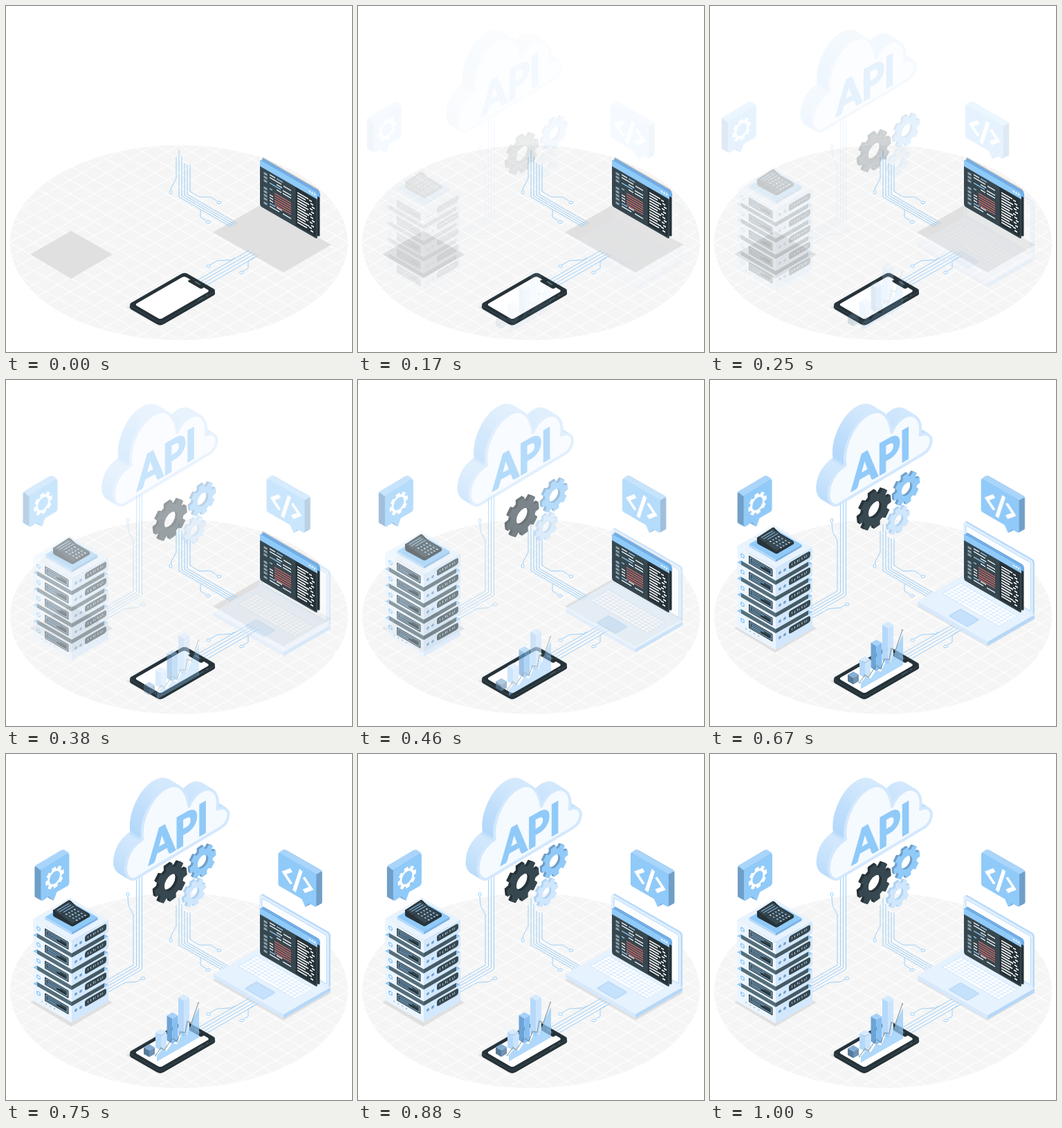
An HTML page for the animation above (1.04 s loop, 500 px wide and 500 px high).

```html
<!DOCTYPE html>
<html>
<head>
<meta charset="utf-8">
<style>
html, body { margin: 0; width: 100%; height: 100%; overflow: hidden; background: #fff }
svg { display: block; width: 100vw; height: 100vh }
</style>
</head>
<body>
<svg id="stage" viewBox="0 0 500 500"></svg>
<script>
const K = 0.577; // isometric slope
const BLUE = '#90caf9', DEEP = '#709fc8', PALE = '#d3e8fd', DARK = '#263238', SLATE = '#37474f';

const range = (n, f) => Array.from({ length: n }, (_, i) => f(i)).join('');
const path = (d, fill, extra = '') => `<path d="${d}" fill="${fill}" ${extra}/>`;
const line = (d, color, w, extra = '') => path(d, 'none', `stroke="${color}" stroke-width="${w}" ${extra}`);
const rect = (x, y, w, h, fill, r = 0, extra = '') =>
  `<rect x="${x}" y="${y}" width="${w}" height="${h}" rx="${r}" fill="${fill}" ${extra}/>`;
const dot = (x, y, r, fill, extra = '') => `<circle cx="${x}" cy="${y}" r="${r}" fill="${fill}" ${extra}/>`;
const plane = (a, b, c, d) => (x, y, s) => `<g transform="matrix(${a} ${b} ${c} ${d} ${x} ${y})">${s}</g>`;
const falling = plane(1, K, 0, 1);   // wall going down to the right
const rising = plane(1, -K, 0, 1);   // wall going up to the right
const flat = plane(1, K, -1, K);     // floor
const tilted = plane(.866, -.5, 0, 1); // rising wall in true units
const moving = (kind, s) => `<g data-move="${kind}">${s}</g>`;

// Box given by its front top vertex, left and right widths, height
function box(x, y, a, b, h, [top, left, right]) {
  return path(`M${x} ${y}l${-a} ${-a * K}l${b} ${-b * K}l${a} ${a * K}z`, top) +
    path(`M${x} ${y}l${-a} ${-a * K}v${h}l${a} ${a * K}z`, left) +
    path(`M${x} ${y}l${b} ${-b * K}v${h}l${-b} ${b * K}z`, right);
}

// Stack copies from back to front to give a shape thickness
const extrude = (d, dx, dy, fill, n = 12) =>
  range(n, i => path(d, fill, `transform="translate(${dx * (1 - i / n)} ${dy * (1 - i / n)})"`));

function gearPath(r, hole) {
  let d = '';
  for (let i = 0; i < 8; i++)
    [[-.36, .78], [-.25, 1], [.25, 1], [.36, .78]].forEach(([o, q]) => {
      const a = (i + o - .15) * Math.PI / 4;
      d += (d ? 'L' : 'M') + (r * q * Math.cos(a)).toFixed(2) + ' ' + (r * q * Math.sin(a)).toFixed(2);
    });
  return d + `ZM${hole} 0A${hole} ${hole} 0 1 0 ${-hole} 0A${hole} ${hole} 0 1 0 ${hole} 0Z`;
}
function gear(x, y, r, hole, front, side, depth) {
  const d = gearPath(r, hole), rule = 'fill-rule="evenodd"';
  return range(6, i => tilted(x - depth * (1 - i / 6), y - depth * .58 * (1 - i / 6), path(d, side, rule))) +
    tilted(x, y, path(d, front, rule));
}

function floor() {
  const grid = range(41, i => {
    const v = (i - 20) * 17.5;
    return `M${v} -350V350M-350 ${v}H350`;
  });
  return '<clipPath id="disc"><ellipse cx="250" cy="342" rx="244" ry="141"/></clipPath>' +
    '<g clip-path="url(#disc)"><rect width="500" height="500" fill="#f5f5f5"/>' +
    flat(250, 342, line(grid, '#fff', 1)) + '</g>' +
    path('M35 359L94 325L154 359L94 394Z', '#e0e0e0') +
    path('M299 327L367 288L470 345L401 385Z', '#e0e0e0') +
    path('M174 435L258 387L300 412L222 463Z', '#e0e0e0');
}

const wires = (d, ends) => line(d, BLUE, .9) +
  ends.map(([x, y, a, b]) => `<ellipse cx="${x}" cy="${y}" rx="${a}" ry="${b}" fill="#fff" stroke="${BLUE}" stroke-width=".9"/>`).join('');

const fixedWires = () => wires(
  'M246 218V249L238.500 263V266' +
  [208, 217, 227, 229].map((top, i) => `M${250 + i * 4} ${top}V${276 - i * 1.2}l${75 - i} ${(75 - i) * K}`).join('') +
  'M266 229V268L279 276H296L305 282M281 295V305L289 310' +
  range(4, i => `M${277 + i * 4.3} ${396 + i * 2.5}l74.5 -43`) +
  'M331 364L325 367L306 368L295 374M358 363L350 369V379L343 383',
  [[238, 269, 2, 2.6], [308, 284, 2.9, 1.8], [292, 312, 2.9, 1.8], [292.5, 376, 2.9, 1.8], [340.5, 385, 2.9, 1.8]]);

const serverWires = () => wires(
  'M176 206L177 219L184 232V305L146 327M188.500 165V307L146 331.500M192.500 165V309L146 336M196.500 165V311.500L146 340.500' +
  'M146 345L172 330.500L189 329L196 325',
  [[176, 203, 1.9, 2.6], [198, 324, 2.9, 1.8]]);

function cloud() {
  const d = 'M186 180C177 184 170 174 172 161C174 144 184 131 196 123C192 97 209 57 235 47C250 42 260 54 263 76' +
    'C270 58 285 48 295 52C304 56 306 66 304 80C314 75 321 81 320 89C319 97 315 103 308 107Z';
  const stops = [[0, '#d6eafd'], [.3, '#bfdefb'], [.56, '#b3d8fb'], [.6, '#d3e8fd'], [1, '#b9dbfb']];
  return '<linearGradient id="side" gradientUnits="userSpaceOnUse" x1="0" y1="42" x2="0" y2="182">' +
    stops.map(([o, c]) => `<stop offset="${o}" stop-color="${c}"/>`).join('') + '</linearGradient>' +
    range(16, i => path(d, 'url(#side)', `stroke="url(#side)" stroke-width="4" transform="translate(${i - 16} ${(i - 16) * .6})"`)) +
    path(d, '#f5faff', `stroke="${PALE}" stroke-width="4" stroke-linejoin="round"`) +
    tilted(205.5, 160, `<text font-family="Lato, sans-serif" font-weight="700" font-size="61" fill="${BLUE}" stroke="${BLUE}" stroke-width="2.8">API</text>`);
}

function gearBubble() {
  const d = 'M52 165.500L87 144.500Q90 143 90 146V186Q90 189 87 191L72 199.500L67.500 212L60.500 206L52 211.500Q49 213 49 210V170Q49 167 52 165.500Z';
  return extrude(d, -9, -5, DEEP) +
    path('M41 162Q40.500 161.500 43 160L78 139.500Q81 137.500 83 138.500L89.500 143L51 166.500L48.500 168Z', '#a9d5fb') +
    path(d, BLUE) + tilted(69, 178.5, path(gearPath(15.5, 8.8), '#fff', 'fill-rule="evenodd"'));
}

function codeBubble() {
  const d = 'M395 143.500L444 171.500Q447 173 447 176V218Q447 222 444 220L437 216L431 221L426 209.500L395 191.500Q392 190 392 187V145Q392 142 395 143.500Z';
  return extrude(d, 8.5, -4.5, DEEP) +
    path('M392.500 143L398.500 138.500Q400 137.500 403 139L453 167.500Q455 169 455 169.500L446.500 174L395 144Z', '#a9d5fb') +
    path(d, BLUE) +
    falling(420, 183, line('M-9 -10L-19.500 0L-9 10M5 -18L-5 18M9 -10L19.500 0L9 10', '#fff', 4.8));
}

function serverUnit(i) {
  const y = 272 + i * 23.4, last = i === 4, h = last ? 24 : 17.5;
  const bay = dot(8, 9.4, 2.3, '#fff', `stroke="${BLUE}" stroke-width="1.6"`) +
    rect(17, 3.5, 34.5, 11.5, SLATE, 1) + rect(19, 5.5, 30.5, 7.5, 'none', 0, `stroke="${BLUE}" stroke-width=".7"`) +
    line('M21 8H39M21 10.700H34', BLUE, .9) + rect(35, 9.5, 13, 2.4, DARK) +
    (last ? range(4, n => dot(13 + n * 6, 18.5, .8, DEEP)) : '');
  const ports = dot(6, 9.5, 2, DEEP) + dot(13, 9.5, 2, DEEP) + rect(19, 3, 31, 9.5, SLATE, 3) +
    range(7, n => rect(23 + n * 3.5 + (i * 3 + n) % 3 * .5, 6 + (n * i) % 2, .9, 3, n % 3 ? PALE : BLUE));
  return (last ? '' : box(95, y + h - 4, 50, 47, 10, [DEEP, '#546e7a', '#455a64'])) +
    box(95, y, 56, 53, h, [i ? BLUE : '#e8f3fe', '#ecf5fe', PALE]) +
    falling(39, y - 32.3, bay) + rising(95, y, ports);
}

function servers() {
  let units = '';
  for (let i = 4; i >= 0; i--) units += serverUnit(i);
  const keys = range(4, r => range(4, c => rect(2 + c * 5, 3 + r * 4, 2.2, 1.6, (r + c) % 3 ? BLUE : PALE, .5)));
  return units + box(95, 259, 38.5, 37.5, 3.5, [BLUE, '#b5d8f9', '#79b2e6']) +
    path('M68 229Q67 227 70 226L90 213Q92 212 94 214L101 221L120 232Q122 234 121 236.500L98 250Q96 251 94 250L70 237Q68 236 68 234Z', DARK) +
    path('M70 227.500L91 214.500L101 222L79 234.500Z', SLATE) +
    line('M74 227.500L91 217.500M77 229.500L94 219.500M83 230L98 221.500', BLUE, 1) +
    path('M80 235L101 222.500L119 233.500L96 246.500Z', SLATE) + flat(100, 222, keys);
}

function laptop() {
  const keys = range(6, r => range(16, c => r === 5 && c > 4 && c < 11 ? '' : rect(8 + c * 5.1, 14 + r * 4.3, 4.3, 3.5, '#fff', .8))) +
    rect(33.5, 35.5, 29.700, 3.5, '#fff', .8);
  return box(401, 378, 101, 68, 5.5, ['#e6f2fe', '#d6e9fd', '#b5d8f9']) +
    flat(368, 281, rect(7, 13, 82.500, 27, PALE, 1) + keys +
      rect(40, 46, 27, 17, '#c5e1fb', 1, 'stroke="#a9d0f5" stroke-width=".7"')) +
    falling(368.5, 202, rect(0, 0, 100.5, 80, '#b9dbfb', 4)) +
    falling(366, 203.500, rect(0, 0, 100.5, 79, '#e3f0fe', 4) +
      rect(4, 4, 93.500, 70, '#fbfdff', 2, 'stroke="#b5d8f9" stroke-width="1"'));
}

function codeWindow() {
  const rows = [0, 1, 2, 4, 5, 6, 7, 8.2].map(n => rect(5.5, 14.5 + n * 5.2, 5, 3.2, '#90a4ae', .5)).join('');
  const code = [[14, 13, 8], [24, 13, 9], [14, 17, 17], [34, 18, 11], [24, 21.500, 8], [14, 25, 16], [33, 25, 12],
    [24, 29, 7], [33, 29, 12], [14, 33, 4], [14, 42, 5], [14, 46, 5], [14, 50, 5], [14, 54.5, 8], [24, 54.5, 8],
    [14, 58.500, 14], [33, 58.500, 12]]
    .map(([x, y, w], i) => rect(x, y, w, 1.5, i % 4 === 1 ? BLUE : '#f2f7fc')).join('');
  const red = range(6, i => rect(21, 36 + i * 3.3, 24, 1.4, '#d9706f'));
  const list = range(12, i => rect(54, 15.5 + i * 3.9, [16, 12, 17, 14][i % 4], 1.8, '#fff') +
    rect(71 + i * 2 % 5, 16.500 + i * 3.9, 4, 1.8, '#fff'));
  const body = rect(0, 0, 83, 67, SLATE, 3) + rect(51.500, 10, 29.500, 55, DARK, 1) +
    path('M0 9.500V3Q0 0 3 0H80Q83 0 83 3V9.500Z', BLUE) +
    [72, 75.5, 79].map(x => dot(x, 4.8, 1.2, '#fff')).join('') + rows + code + red + list;
  return falling(367, 222, body);
}

const windowBack = () => falling(370, 217.500, rect(0, 0, 83, 66, '#c7c7c7', 3));
const windowEdge = () => falling(370.5, 220, rect(0, 0, 83, 66, DARK, 3) +
  path('M-1 9V3Q0 0 3 0H80Q83 0 83 3V9Z', '#6fb0ee'));

function phone() {
  const slab = f => rect(-1.5, -1.5, 47, 82, f, 5);
  return range(5, i => flat(258, 390 - i, slab(i > 3 ? '#455a64' : DARK))) +
    flat(258, 386, rect(-.9, -.9, 45.8, 80.8, DARK, 4.500) + rect(3.5, 4, 37, 71.5, '#fff', 3) +
      rect(12, 3, 20, 5, DARK, 2) + rect(18, 2.5, 8, 1, '#78909c', .5)) +
    line('M277 426L285 421M289 419L292 417', '#546e7a', .9);
}

function chart() {
  const light = ['#d6eafd', '#b5d8fb', '#cbe4fd'];
  const bars = [[257, 358, 410, light], [240.5, 384, 420, ['#a5d2fa', '#6da3d6', '#86bff2']],
    [224, 408, 430, light], [207, 430, 439.5, ['#86aed3', '#587a99', '#6d93b6']]];
  const trend = [[216, 437], [224, 426], [229, 429], [240, 412], [247, 417], [252, 403], [259, 404], [262, 388], [268, 390], [278, 361]];
  return bars.map(([x, y, end, c]) => box(x, y, 8, 8, end - y, c)).join('') +
    path('M218 446V437L226 428L232 431L240 419L247 421L255 404L262 408L270 385L279 367V411Z', BLUE, 'opacity=".72"') +
    line('M' + trend.join('L'), '#546e7a', .8) + trend.map(([x, y]) => dot(x, y, .9, '#fff', 'stroke="#546e7a" stroke-width=".5"')).join('');
}

const stage = document.getElementById('stage');
stage.innerHTML = floor() + fixedWires() + moving('fade', serverWires()) +
  moving('left', cloud()) + moving('up', servers()) +
  moving('left', gearBubble() + codeBubble()) +
  moving('up', gear(284.5, 157, 22, 9, BLUE, DEEP, 3) + gear(273, 202.500, 18.5, 7.5, '#cfe6fc', '#b0d3f4', 3) +
    gear(238.5, 187, 27, 11, SLATE, DARK, 3.5)) +
  windowBack() + moving('up', laptop()) + windowEdge() + codeWindow() +
  phone() + moving('up', chart());

// Cubic Bezier easing (.36, -.01, .5, 1.38), overshooting near the end
function ease(x) {
  const at = (t, a, b) => 3 * (1 - t) * (1 - t) * t * a + 3 * (1 - t) * t * t * b + t * t * t;
  let lo = 0, hi = 1;
  for (let i = 0; i < 24; i++) {
    const mid = (lo + hi) / 2;
    if (at(mid, .36, .5) < x) lo = mid; else hi = mid;
  }
  return at(lo, -.01, 1.38);
}

const parts = [...document.querySelectorAll('[data-move]')];
function draw() {
  const step = Math.floor((performance.now() % 1040 + 4) * .024); // 24 poses a second
  const p = ease(Math.min(1, step / 24)), away = 30 * (1 - p);
  for (const el of parts) {
    const kind = el.dataset.move;
    el.setAttribute('opacity', Math.max(0, Math.min(1, p)));
    el.setAttribute('transform', `translate(${kind === 'left' ? -away : 0} ${kind === 'up' ? away : 0})`);
  }
  requestAnimationFrame(draw);
}
draw();
</script>
</body>
</html>
```
